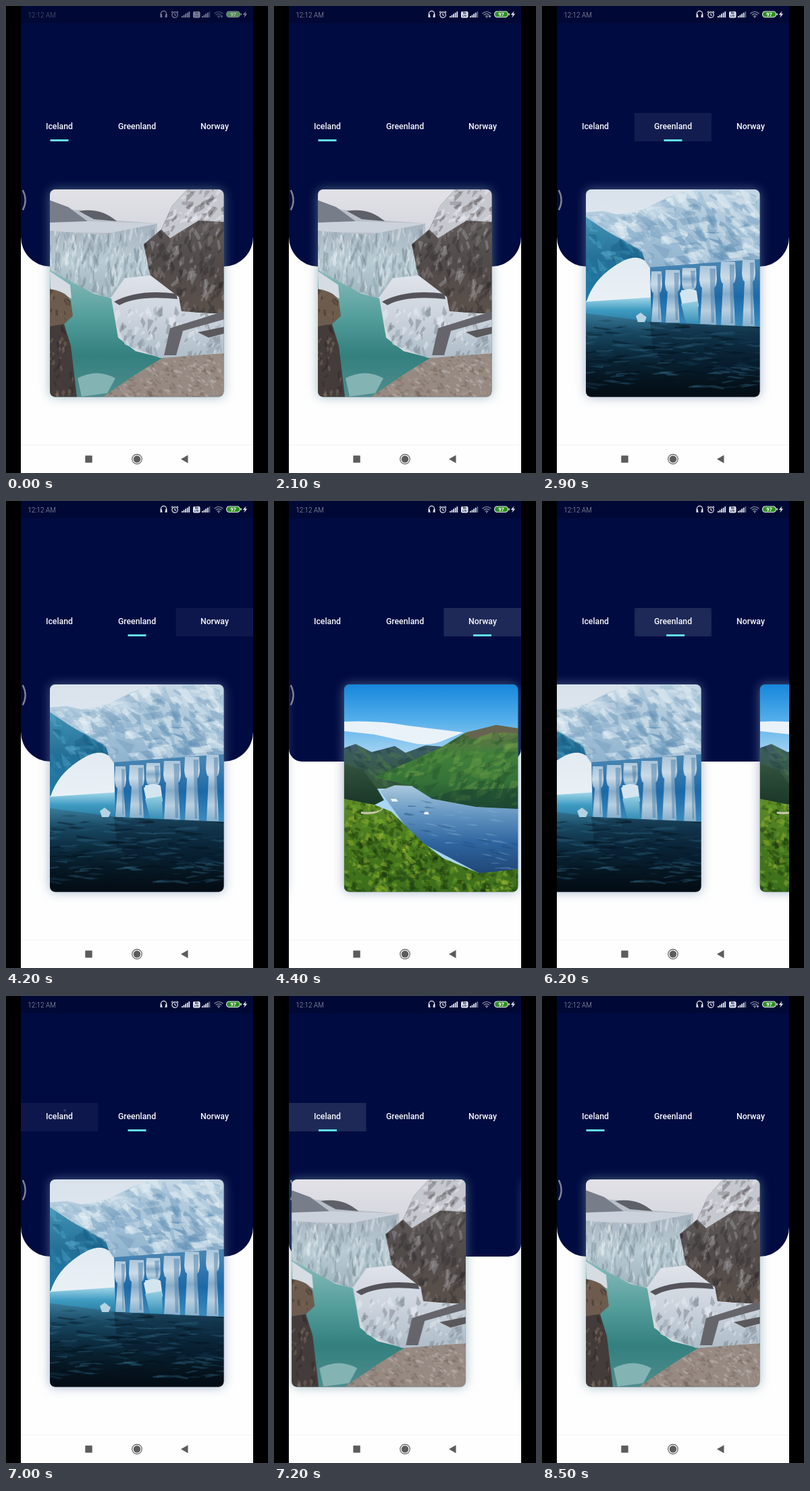
Recreate the animation shown at these times as an HTML page with a canvas. Size 388 px wide and 690 px high, loop 8600 ms.

```html
<!DOCTYPE html>
<html lang="en">
<head>
<meta charset="utf-8">
<title>Travel tabs</title>
<style>
html, body { margin: 0; width: 100%; height: 100%; overflow: hidden; background: #000; }
canvas { display: block; width: 388px; height: 690px; }
</style>
</head>
<body>
<canvas id="stage" width="388" height="690"></canvas>
<script>
const LOOP = 8600;
const LEFT = 22, WIDTH = 344, TAB = WIDTH / 3, PAGE = 344.5;
const CARD = { x: 65, y: 271, w: 257.5, h: 306.5, r: 8 };
const NAVY = '#000b41';
const FONT = 'Roboto, "Open Sans", sans-serif';
const ctx = document.getElementById('stage').getContext('2d');

const clamp = (v, a = 0, b = 1) => Math.min(b, Math.max(a, v));
const ramp = (t, a, b) => clamp((t - a) / (b - a));

function random(seed) {
  return () => (seed = (seed * 16807) % 2147483647) / 2147483647;
}

// ---------- pictures ----------

function picture(paint) {
  const canvas = document.createElement('canvas');
  canvas.width = 258;
  canvas.height = 307;
  const g = canvas.getContext('2d');
  g.translate(-CARD.x, -CARD.y);
  const rnd = random(71);

  const fade = (y0, y1, ...colors) => {
    const grad = g.createLinearGradient(0, y0, 0, y1);
    colors.forEach((c, i) => grad.addColorStop(i / (colors.length - 1), c));
    return grad;
  };
  const shape = (d, fill) => {
    g.fillStyle = fill;
    g.fill(new Path2D(d));
  };
  // Small slanted facets scattered inside a shape.
  const rough = (d, [x, y, w, h], n, colors, len, slope, thick = 0.5) => {
    g.save();
    g.clip(new Path2D(d));
    g.globalAlpha = 0.4;
    for (let i = 0; i < n; i++) {
      const l = len * (0.4 + rnd());
      g.save();
      g.translate(x + rnd() * w, y + rnd() * h);
      g.rotate(slope + (rnd() - 0.5) * thick * 2);
      g.fillStyle = colors[Math.floor(rnd() * colors.length)];
      g.beginPath();
      g.moveTo(-l / 2, 0);
      g.lineTo((rnd() - 0.5) * l, -l * thick / 2);
      g.lineTo(l / 2, 0);
      g.lineTo((rnd() - 0.5) * l, l * thick / 2);
      g.fill();
      g.restore();
    }
    g.restore();
  };
  paint({ fade, shape, rough });
  return canvas;
}

function iceland({ fade, shape, rough }) {
  shape('M65 271H323V578H65Z', fade(271, 330, '#e2e1e7', '#d6d8df'));
  shape('M65 288L100 301 130 303 165 317 224 321V350H65Z', '#b9bfc9');
  shape('M65 287L92 297 122 319 65 321Z', '#777d89');
  shape('M108 303Q140 297 164 318L130 315Z', '#5d6069');
  shape('M65 320L120 318 222 321V336L65 334Z', '#ccd2db');

  const fall = 'M65 332L140 338 222 322 216 400 152 432 110 416 65 402Z';
  shape(fall, fade(325, 430, '#a7b4c0', '#b9cbd3', '#9fb4be'));
  rough(fall, [65, 325, 155, 100], 240, ['#eef3f6', '#d7e3e9', '#71838f', '#8aa1ad'], 20, 1.6, 0.25);

  const lake = 'M65 390L92 405 130 425 156 432 166 490 192 510 232 520 150 578H100L95 500 65 470Z';
  shape(lake, fade(395, 577, '#86b9b9', '#56a09d', '#33807f', '#4f8c8d'));
  shape('M106 550Q135 535 162 550L150 572 112 577Z', '#84b3b4');
  shape('M65 392L95 412 97 432 66 420Z', '#d5dce2');

  const cliff = 'M268 271H323V456L260 451 214 400 204 352 230 330 246 295Z';
  shape(cliff, fade(300, 455, '#65605f', '#514b4a', '#5b514b'));
  rough(cliff, [204, 300, 119, 155], 230, ['#2f2b2d', '#8a8380', '#3c3737', '#a4a2a5'], 14, 1.8);
  const cap = 'M268 271H323V319L285 317 243 343 230 330 246 295Z';
  shape(cap, '#c6c8d0');
  rough(cap, [230, 271, 93, 70], 75, ['#5b5556', '#f1f1f5', '#77757b'], 13, 2.4);

  const bank = 'M156 430L176 402 214 398 256 430 260 452 323 455V515L228 520 176 500 164 470Z';
  shape(bank, fade(400, 520, '#dfe2e9', '#cbd3dd', '#aebdc8'));
  rough(bank, [160, 450, 163, 70], 100, ['#eef1f6', '#8998a5', '#6b7079'], 14, 1.9);
  shape('M160 437Q195 418 252 425L254 433Q195 427 168 442Z', '#55535a');
  shape('M234 516L243 476 323 451V463L262 480 252 516Z', '#66656c');
  shape('M284 482L323 474V484L300 490Z', '#5b585c');

  shape('M65 418Q90 422 96 436L99 458 85 471 65 473Z', '#6d5c4e');
  shape('M65 473L86 470 96 502 105 578H65Z', '#433c3a');
  rough('M65 418L96 436 86 470 105 578H65Z', [65, 418, 40, 160], 70, ['#2b2726', '#8a7765'], 10, 1.5);

  const shore = 'M143 578Q200 538 232 520L323 513V578Z';
  shape(shore, '#968a83');
  rough(shore, [143, 513, 180, 65], 320, ['#c9c1bd', '#6d6059', '#b2a49b', '#7d6a5d'], 8, 0.5);
}

function greenland({ fade, shape, rough }) {
  shape('M65 271H323V578H65Z', fade(271, 440, '#d9e2eb', '#e9f1f6'));
  shape('M65 437L110 434 168 430H232V472H65Z', fade(430, 468, '#a5d8ea', '#3f9cc2', '#2b7ba3'));

  const ice = 'M65 305L90 303 112 308 152 300 182 284 206 275 232 271H323V382L240 392 166 396 152 376Q135 364 106 385 76 405 66 436H65Z';
  shape(ice, fade(275, 390, '#c3d6e4', '#a6c3d8', '#8db2ce'));
  const arch = 'M65 312L92 330 148 362 152 376Q135 364 106 385 76 405 66 436H65Z';
  shape(arch, fade(315, 435, '#4391b2', '#236f97', '#1f7ba6'));
  rough(arch, [65, 315, 80, 100], 40, ['#14597f', '#55a9c8', '#2f86ad'], 24, 0.7);
  const face = 'M65 305L112 308 152 300 206 275 232 271H323V382L166 396 148 364 92 330Z';
  rough(face, [75, 275, 248, 115], 280, ['#eef4f8', '#7199b8', '#dce8f0', '#8fb2cc', '#5f8fb3'], 26, 0.5);

  // Columns of ice: a wide lumpy head over a narrower trunk.
  shape('M160 386L323 374V474L232 472 228 420H206L212 468H162Z', fade(385, 474, '#4583b1', '#1c69a8', '#3c8cbf'));
  const column = (x, w, top, foot) => {
    shape(`M${x} ${top}H${x + w}L${x + w + 1} ${top + 20}Q${x + w} ${top + 32} ${x + w - 3} ${top + 32}L${x + w} ${foot}H${x}L${x + 3} ${top + 32}Q${x} ${top + 32} ${x - 1} ${top + 20}Z`,
      fade(top, foot, '#a9c5da', '#cbdbe7', '#86acc9', '#b9cfdf', '#84aecb'));
    shape(`M${x + w * 0.6} ${top + 4}H${x + w - 1}L${x + w - 3} ${foot - 4}H${x + w * 0.7}Z`, 'rgba(62,118,164,.45)');
  };
  column(162, 15, 392, 467);
  column(183, 21, 390, 468);
  column(208, 20, 387, 420);
  column(234, 24, 384, 472);
  column(265, 21, 378, 473);
  column(297, 18, 375, 474);
  shape('M204 424Q216 414 229 421L232 444H208Z', '#d3e6f0');
  shape('M206 440L231 436 232 472H214Z', fade(438, 470, '#8fcbe0', '#348db5'));

  const sea = 'M65 454L120 461 165 467 230 470 323 474V578H65Z';
  shape(sea, fade(452, 577, '#3b7f9f', '#184761', '#0b2a3d', '#061723', '#030b13'));
  shape('M160 467L323 474V535L240 545 165 515Z', 'rgba(5,24,40,.4)');
  rough(sea, [65, 460, 258, 105], 200, ['#2d6480', '#04101b', '#173f57'], 28, 0, 0.14);
  shape('M139 458L146 453 155 460 152 467H142Z', '#b5d3e3');
}

function norway({ fade, shape, rough }) {
  shape('M65 271H323V578H65Z', fade(271, 375, '#1687dc', '#53aeea', '#a9d6f3'));
  shape('M65 326Q115 324 160 332L242 342 214 353Q190 364 164 357L110 345 65 340Z', '#e9f2f9');
  const far = 'M65 365L82 359 106 371 140 362 156 372 186 361 212 363V425H65Z';
  shape(far, fade(360, 415, '#3d5d66', '#35583f'));
  rough(far, [65, 362, 140, 55], 60, ['#22403f', '#4d7a4c'], 16, 0.6);

  const slope = 'M110 408L160 386 205 366 245 342 290 331 323 336V457L260 452 195 440 165 421Z';
  shape(slope, fade(335, 455, '#687049', '#41803a', '#357238', '#1f4c35'));
  rough(slope, [110, 335, 213, 118], 220, ['#74a34a', '#244f2e', '#2d6433', '#5b9240'], 20, 2.5);
  shape('M245 343L290 331 323 336V343L285 342 255 352Z', '#66644f');
  shape('M190 440L230 427 323 424V457L260 452Z', 'rgba(26,67,48,.5)');

  shape('M118 428L140 420 165 421 195 440 260 452 323 455V550H265L170 500Z', fade(420, 548, '#abc9dd', '#6496c2', '#2f659f', '#204878'));
  rough('M165 440L323 460V545H265L150 470Z', [140, 440, 183, 105], 70, ['#86afd2', '#1d4476'], 20, 0.15, 0.12);
  shape('M65 388L92 397 114 425 124 442 108 450 65 444Z', fade(388, 446, '#34543e', '#1b3829'));

  const woods = 'M65 440L110 449 135 459 158 482 182 505 212 528 265 550 323 544V578H65Z';
  shape(woods, fade(440, 577, '#5d8c28', '#47771d', '#3d6e1b'));
  rough(woods, [65, 440, 258, 138], 900, ['#a5bd35', '#1f4313', '#6aa22a', '#12290c'], 10, 0.9, 0.8);
  shape('M90 459Q112 461 121 455L118 450 123 455Q112 465 90 462Z', '#c9c7b0');
  shape('M134 440L142 440 145 444H136Z', '#eef3f7');
  shape('M183 460L189 459 191 463H184Z', '#eef3f7');
}

const pages = [
  { name: 'Iceland', image: picture(iceland), glow: 'rgba(112,150,165,.65)' },
  { name: 'Greenland', image: picture(greenland), glow: 'rgba(115,138,175,.65)' },
  { name: 'Norway', image: picture(norway), glow: 'rgba(115,140,175,.65)' },
];

// ---------- timing ----------

const taps = [
  { at: 2400, from: 0, to: 1, x: 194, y: 178, cut: true },
  { at: 4100, from: 1, to: 2, x: 305, y: 177 },
  { at: 5946, from: 2, to: 1, x: 194, y: 178 },
  { at: 6900, from: 1, to: 0, x: 87, y: 169 },
];

// Cubic-bezier easing with control points (.25,.1) and (.25,1).
function ease(x) {
  const bez = (a, b, s) => 3 * a * s * (1 - s) ** 2 + 3 * b * s * s * (1 - s) + s ** 3;
  let lo = 0, hi = 1;
  for (let i = 0; i < 18; i++) {
    const mid = (lo + hi) / 2;
    if (bez(0.25, 0.25, mid) < x) lo = mid; else hi = mid;
  }
  return bez(0.1, 1, lo);
}

function position(t) {
  let page = 0, bar = 0;
  for (const tap of taps) {
    const start = tap.at + (tap.cut ? 100 : 120);
    if (t < start) break;
    const p = tap.cut ? 1 : ease(ramp(t, start, start + 300));
    const step = tap.to - tap.from;
    page = tap.from + step * p;
    bar = tap.from + step * (1 - (1 - p) ** 2.5);
  }
  return { page, bar };
}

// ---------- drawing ----------

function fillBox(x, y, w, h, r, color) {
  ctx.fillStyle = color;
  ctx.beginPath();
  ctx.roundRect(x, y, w, h, r);
  ctx.fill();
}

function text(str, x, y, font, color, align = 'center') {
  ctx.font = `${font} ${FONT}`;
  ctx.fillStyle = color;
  ctx.textAlign = align;
  ctx.fillText(str, x, y);
}

function line(d, width, color) {
  ctx.lineWidth = width;
  ctx.strokeStyle = color;
  ctx.stroke(new Path2D(d));
}

function poly(d, color) {
  ctx.fillStyle = color;
  ctx.fill(new Path2D(d));
}

function bars(x, lit) {
  for (let i = 0; i < 5; i++) {
    const h = 2 + i * 1.7;
    fillBox(x + i * 2.6, 17 - h, 1.8, h, 0, i < lit ? '#e6e8ee' : '#6a7088');
  }
}

function statusBar(t) {
  const white = '#e6e8ee';
  ctx.save();
  fillBox(LEFT, 0, WIDTH, 25, 0, '#000935');
  ctx.globalAlpha = 0.55 + 0.45 * ramp(t, 0, 900);
  text('12:12 AM', 32.3, 16.5, '300 10px', '#9a9fb1', 'left');
  line('M229.4 12.5V11.5A4.1 4.1 0 0 1 237.6 11.5V12.5', 1.2, white);
  poly('M228.6 12H230.6L231.6 16.8H228.4ZM238.4 12H236.4L235.4 16.8H238.6Z', white);
  line('M254.3 13A4.2 4.2 0 1 1 245.9 13A4.2 4.2 0 1 1 254.3 13M250 10.5V13.2L252 14.2M244.8 9.6L247 7.6M255.2 9.6L253 7.6', 1.2, white);
  bars(260, 5);
  fillBox(277, 8, 10.5, 9.5, 2, white);
  text('Vo', 282.2, 12.4, '700 4.5px', NAVY);
  text('LTE', 282.2, 16.4, '700 4px', NAVY);
  bars(290, 4);
  line('M308.5 11.2Q315 5.8 321.5 11.2M310.7 13.4Q315 9.9 319.3 13.4M312.8 15.4Q315 13.8 317.2 15.4', 1.2, '#8f95a8');
  fillBox(314, 15.8, 2, 1.8, 1, '#8f95a8');
  if (t < 2400 || t >= 8500) poly('M317.6 14.2H321.4L319.5 17.4Z', '#b9bdca');
  fillBox(326, 7.5, 21, 9.5, 4.5, white);
  fillBox(347.5, 10.5, 1.4, 3.5, 0.7, white);
  fillBox(327.1, 8.6, 18.8, 7.3, 3.6, '#2f8f22');
  text('97', 336.6, 15, '700 7.5px', '#fff');
  poly('M355.5 7.5L350.8 13H353.6L352.4 17.3 357.2 11.6H354.3Z', white);
  ctx.restore();
}

function tabs(t, bar) {
  for (const tap of taps) {
    const age = t - tap.at;
    if (age <= 0 || age >= 700) continue;
    const x = LEFT + tap.to * TAB;
    ctx.save();
    ctx.beginPath();
    ctx.rect(x, 158, TAB, 42);
    ctx.clip();
    const out = 1 - ramp(age, 350, 700);
    const glow = (0.05 * ramp(age, 0, 100) + 0.05 * ramp(age, 100, 240)) * out;
    fillBox(x, 158, TAB, 42, 0, `rgba(255,255,255,${glow})`);
    ctx.fillStyle = `rgba(255,255,255,${(age < 110 ? 0.2 : 0.025) * out})`;
    ctx.beginPath();
    ctx.arc(tap.x, tap.y, 1.8 + 110 * ramp(age, 110, 400), 0, 7);
    ctx.fill();
    ctx.restore();
  }
  pages.forEach((p, i) => text(p.name, 79 + i * 115, 182, '500 12.3px', '#f6f7fb'));
  fillBox(65.5 + bar * 115, 197, 27, 3, 0, '#62dfe7');
}

function cards(page) {
  pages.forEach((p, i) => {
    const x = CARD.x + (i - page) * PAGE;
    if (x > 390 || x < -280) return;
    ctx.save();
    ctx.shadowColor = p.glow;
    ctx.shadowBlur = 16;
    fillBox(x, CARD.y, CARD.w, CARD.h, CARD.r, '#4d6a7c');
    ctx.shadowColor = 'transparent';
    ctx.clip();
    ctx.drawImage(p.image, x, CARD.y);
    ctx.restore();
  });
}

function navBar() {
  const grey = '#5c5c5c';
  fillBox(LEFT, 648, WIDTH, 42, 0, '#fefefe');
  fillBox(LEFT, 648, WIDTH, 1, 0, '#f3f3f3');
  fillBox(117.3, 664.3, 10.4, 10.4, 0.5, grey);
  line('M201.2 669.5A7.2 7.2 0 1 1 186.8 669.5A7.2 7.2 0 1 1 201.2 669.5', 1.2, grey);
  fillBox(188.8, 664.3, 10.4, 10.4, 5.2, grey);
  poly('M259 669.5L269.5 663.5V675.5Z', grey);
}

function draw(t) {
  const { page, bar } = position(t);
  const off = Math.abs(page - Math.round(page));
  ctx.fillStyle = '#000';
  ctx.fillRect(0, 0, 388, 690);
  ctx.save();
  ctx.beginPath();
  ctx.rect(LEFT, 0, WIDTH, 690);
  ctx.clip();
  fillBox(LEFT, 0, WIDTH, 690, 0, '#fefefe');
  const r = 44 * (1 - ramp(off, 0, 0.2));
  fillBox(LEFT, 0, WIDTH, 385, [0, 0, r, r], NAVY);
  line('M24.8 272Q32.5 287 24.8 301.5', 2.4, '#7f8494');
  cards(page);
  tabs(t, bar);
  statusBar(t);
  navBar();
  ctx.restore();
}

const begin = performance.now();
function tick() {
  draw((performance.now() - begin) % LOOP);
  requestAnimationFrame(tick);
}
tick();
</script>
</body>
</html>
```
